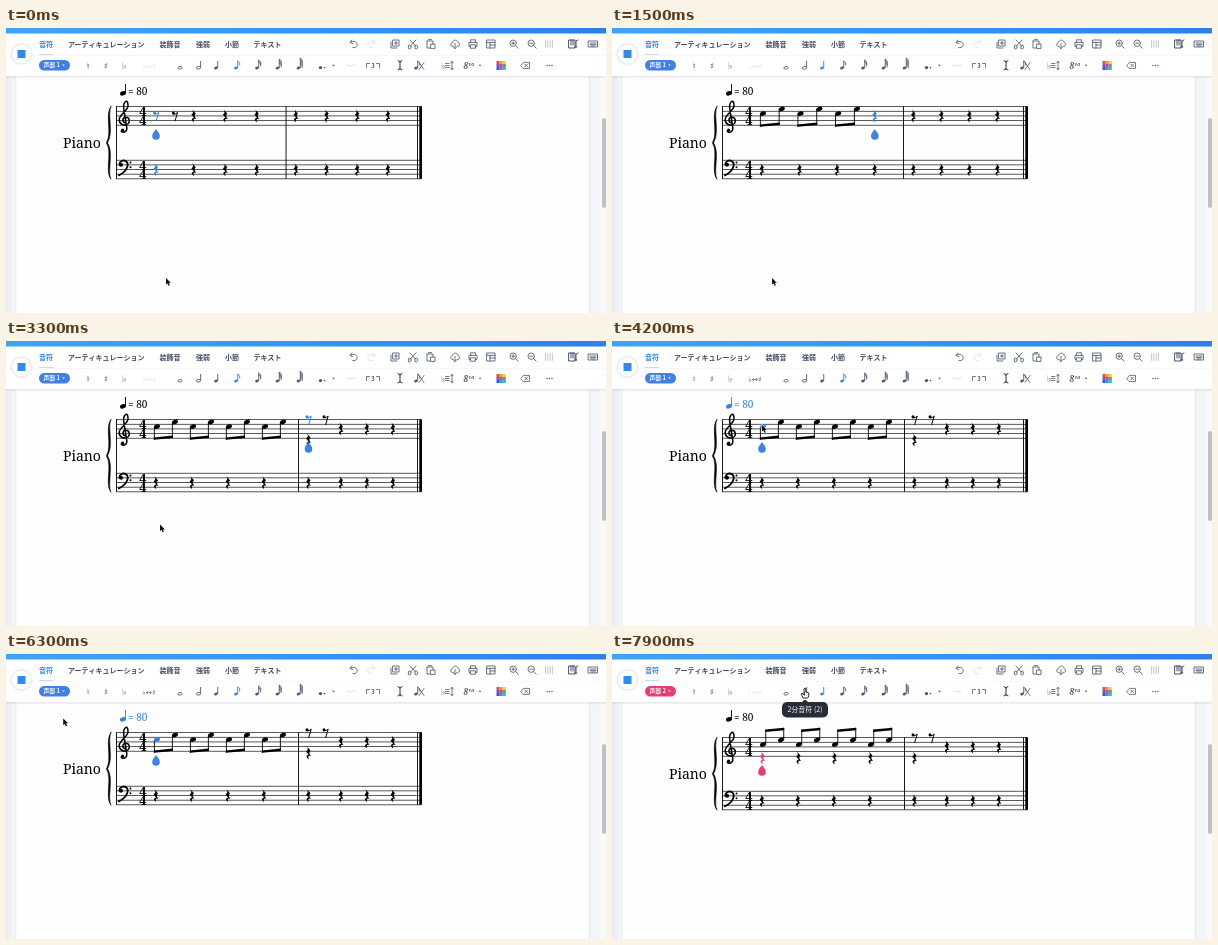
An HTML page with a canvas for the animation above (8 s loop, 600 px wide and 285 px high).

```html
<!DOCTYPE html>
<html lang="ja">
<head>
<meta charset="utf-8">
<title>Score editor</title>
<style>
html, body { margin: 0; width: 100%; height: 100%; overflow: hidden; background: #fff; }
canvas { display: block; width: 600px; height: 285px; }
</style>
</head>
<body>
<canvas id="stage"></canvas>
<script>
const LOOP = 8000;
const canvas = document.getElementById('stage');
const ctx = canvas.getContext('2d');
const dpr = window.devicePixelRatio || 1;
canvas.width = 600 * dpr;
canvas.height = 285 * dpr;

const BLUE = '#2f83ee', PINK = '#ea3a76', INK = '#000', ICON = '#4c5870', FAINT = '#dde0e6';
const SERIF = '"Noto Serif", serif';
const SANS = '"Noto Sans CJK JP", "Noto Sans CJK", "Noto Sans", sans-serif';

// ---------- drawing helpers ----------
function path(d, x, y, { fill, stroke, w = 1, s = 1 } = {}) {
  const p = new Path2D(d);
  ctx.save();
  ctx.translate(x, y);
  ctx.scale(s, s);
  ctx.lineWidth = w;
  ctx.lineCap = ctx.lineJoin = 'round';
  if (fill) { ctx.fillStyle = fill; ctx.fill(p); }
  if (stroke) { ctx.strokeStyle = stroke; ctx.stroke(p); }
  ctx.restore();
}
function rect(x, y, w, h, color) {
  ctx.fillStyle = color;
  ctx.fillRect(x, y, w, h);
}
function round(x, y, w, h, r, color) {
  ctx.beginPath();
  ctx.roundRect(x, y, w, h, r);
  ctx.fillStyle = color;
  ctx.fill();
}
function dot(x, y, r, color) {
  ctx.beginPath();
  ctx.arc(x, y, r, 0, Math.PI * 2);
  ctx.fillStyle = color;
  ctx.fill();
}
function text(str, x, y, font, color, align = 'left') {
  ctx.font = font;
  ctx.fillStyle = color;
  ctx.textAlign = align;
  ctx.fillText(str, x, y);
}
function gradient(x0, y0, x1, y1, ...colors) {
  const g = ctx.createLinearGradient(x0, y0, x1, y1);
  colors.forEach((c, i) => g.addColorStop(i / (colors.length - 1), c));
  return g;
}

// ---------- music glyphs ----------
const QUARTER = 'M-1.8-6.6L2-2.3Q-.5 .2 2.5 3.1Q-1.5 2.2 .3 6.6Q-4.2 3.2 .1 1.9L-2.4-1.2Q.6-3.4-1.8-6.6Z';
const TREBLE = 'M.2 16.2C-3 15.4-2.8 10.8 .6 10.6C4.6 10.4 5.4 15.4 2.8 17.4' +
  'C-.6 19.7-5.8 18-5.8 13C-5.8 7.6 3 4.2 3-.8C3-3.6 2.2-5.4 1.2-5.4' +
  'C-.8-4.2-1.8-1-1.2 2.4L1.8 21C2.3 25.4-2 27-3.8 24.4';
const BASS = 'M-5.2 4.4C-5 .6-1.2-.2 .8.7C5 2.6 4 10.4-5.6 15.2';

const quarterRest = (x, y, c = INK) => path(QUARTER, x, y, { fill: c });
function eighthRest(x, y, c = INK) {
  dot(x - 1.5, y - 2.7, 1.5, c);
  path('M-1.6-1.6Q1-1.2 2.7-3.4L.2 5', x, y, { stroke: c });
}
function head(x, y, c = INK) {
  ctx.beginPath();
  ctx.ellipse(x, y, 3.1, 2.15, -0.38, 0, Math.PI * 2);
  ctx.fillStyle = c;
  ctx.fill();
}
const stem = (x, y0, y1, c = INK) => rect(x - 0.4, Math.min(y0, y1), 0.9, Math.abs(y1 - y0), c);

function drop(x, y, c) {
  path('M0-6C1.4-3.4 3.8-2 3.8 1A3.8 3.8 0 0 1-3.8 1C-3.8-2-1.4-3.4 0-6Z', x, y, { fill: c });
}

function staff(y) {
  for (let i = 0; i < 5; i++) rect(110, y + i * 4.65 - 0.35, 305, 0.75, '#222');
  for (const b of [9.3, 18.6]) text('4', 137, y + b, `900 13px ${SERIF}`, INK, 'center');
}

// ---------- score ----------
// Bar widths for each count of beats split into eighths.
const LAYOUT = {
  1: { bar: 280, e: 18.9, q: 31.5, last: 382 },
  2: { bar: 286, e: 19.1, q: 31, last: 384 },
  3: { bar: 291.5, e: 18.8, q: 29, last: 385.5 },
  4: { bar: 297, e: 18.6, q: 28, last: 387 }
};
const SPLIT_NEXT = { bar: 292.5, e: 18, q: 28, last: 387 };

function notes(st, x, top) {
  const up = st.voice === 2;
  const ys = [top + 7, top + 2.4];
  for (let i = 0; i < st.n; i++) {
    const hi = i % 2, nx = x(i) + 1, c = st.picked && i === 0 ? BLUE : INK;
    const single = !hi && i === st.n - 1;
    const sx = nx + (up ? 2.7 : -2.7);
    const end = up ? top - 8 - hi * 1.8 : single ? top + 23 : top + 20.2 - hi * 1.8;
    stem(sx, ys[hi], end, single ? INK : INK);
    head(nx, ys[hi], c);
    if (single) path('M0 0C1 -4 5.5 -5 4 -10C4 -6.5 2 -6 0 -5Z', sx, end, { fill: INK });
    if (hi) {
      const px = x(i - 1) + 1 + (up ? 2.7 : -2.7), d = up ? 2.4 : -2.4, y0 = end + 1.8;
      path(`M${px - .4} ${y0}L${sx + .5} ${end}V${end + d}L${px - .4} ${y0 + d}Z`, 0, 0, { fill: INK });
    }
  }
}

function score(st) {
  const v2 = st.voice === 2, shift = v2 ? 5 : 0;
  const top = 78.6 + shift, low = 132.2 + shift, mid = top + 9.2, bassMid = low + 9.4;
  const L = st.next ? SPLIT_NEXT : LAYOUT[st.split];
  const x = i => 150 + L.e * Math.min(i, st.split * 2) + L.q * Math.max(0, i / 2 - st.split);

  const tc = st.picked ? BLUE : INK;
  head(117, 65.3, tc);
  stem(119.5, 56, 65, tc);
  text('= 80', 122, 66.5, `10px ${SERIF}`, tc);
  text('Piano', 57, 119.5 + shift, `14px ${SERIF}`, INK);

  staff(top);
  staff(low);
  path('M105 0C98.5 8 106.5 27 100.3 36.5C106.5 46 98.5 65 105 73C101.2 64 108 47 101.6 36.5C108 26 101.2 9 105 0Z',
    0, top - 0.3, { fill: INK, stroke: INK, w: 0.5 });
  const h = low + 18.9 - top;
  rect(110, top - 0.3, 0.9, h, INK);
  rect(L.bar - 0.4, top - 0.3, 0.9, h, INK);
  rect(411, top - 0.3, 0.9, h, INK);
  rect(413.3, top - 0.3, 2.7, h, INK);
  path(TREBLE, 119, top, { stroke: INK, w: 1.5 });
  dot(116.6, top + 23.6, 1.6, INK);
  path(BASS, 118.5, low, { stroke: INK, w: 1.8 });
  dot(115, low + 4.6, 2, INK);
  dot(124.5, low + 2.4, 1, INK);
  dot(124.5, low + 7, 1, INK);

  // first bar
  notes(st, x, top);
  for (let b = 0; b < 4; b++) {
    const i = b * 2, sel = k => (k === st.n ? BLUE : INK);
    if (b < st.split) {
      for (const k of [i, i + 1]) if (k >= st.n) eighthRest(x(k), mid, sel(k));
    } else quarterRest(x(i), mid, sel(i));
    quarterRest(x(i), bassMid, b === 0 && st.n === 0 ? BLUE : INK);
    if (v2) quarterRest(x(i) + 0.5, mid + 11, b === 0 ? PINK : INK);
  }

  // second bar
  const first = L.bar + 10, here = st.n === 8 && !st.picked && !v2 ? BLUE : INK;
  for (let b = 0; b < 4; b++) {
    const bx = st.next && b ? 335 + (b - 1) * 26 : first + b * (L.last - first) / 3;
    quarterRest(bx, bassMid);
    if (!st.next || b) quarterRest(bx, mid, b ? INK : here);
  }
  if (st.next) {
    eighthRest(first, mid - 9.3, here);
    eighthRest(first + 17, mid - 9.3);
    quarterRest(first, mid + 11);
  }

  const dx = st.picked || v2 ? 150 : st.n < 8 ? x(st.n) : first;
  drop(dx, v2 ? 117 : 107, v2 ? PINK : '#3b82ea');
}

// ---------- toolbars ----------
const ACTIONS = [
  [348, 'M-2-4L-4-1.6L-1.2-.4M-3.6-1.6C0-4.5 4-1.5 3 1.6C2.4 3.4 .5 4 -1.2 3.6'],
  [365, 'M2-4L4-1.6L1.2-.4M3.6-1.6C0-4.5-4-1.5-3 1.6C-2.4 3.4-.5 4 1.2 3.6', FAINT],
  [389, 'M-4-2V4H2M-2-4H4V2H-2ZM1-2.6V.6M-.6-1H2.6'],
  [407, 'M-3-4L2.5 2M3-4L-2.5 2M-2 3a1.4 1.4 0 1 1-2.6 0a1.4 1.4 0 1 1 2.6 0M4.6 3a1.4 1.4 0 1 1-2.6 0a1.4 1.4 0 1 1 2.6 0'],
  [425, 'M-4-3H2V0M-4-3V4H-1M-2.5-4.4H.5M0 0H4V4.4H0Z'],
  [449, 'M-2 2.4H-3C-5 1.8-4.6-1.2-2.5-1.4C-1.6-5 3-4.4 3-1.4C5.4-.8 5 2.4 2.6 2.4H2M0-.5V4.5M-1.6 3L0 4.6L1.6 3'],
  [467, 'M-2.4-1.6V-4.2H2.4V-1.6M-2.4 2.4H-4V-1.6H4V2.4H2.4M-2.4.8H2.4V4.2H-2.4Z'],
  [485, 'M-4-4H4V4H-4ZM-4-1.6H4M-1 1H4M-1-1.6V4'],
  [508, 'M2.4-.8a3.2 3.2 0 1 1-6.4 0a3.2 3.2 0 1 1 6.4 0M1.6 1.6L4.2 4.2M-2.2-.8H.6M-.8-2.2V.6'],
  [526, 'M2.4-.8a3.2 3.2 0 1 1-6.4 0a3.2 3.2 0 1 1 6.4 0M1.6 1.6L4.2 4.2M-2.2-.8H.6'],
  [543, 'M-3.4-3.4V3.4M-1.2-3.4V3.4M1.2-3.4V3.4M3.4-3.4V3.4', '#b9bec8'],
  [567, 'M-4-4H2V4H-4ZM-2-4V1M0-4V1M3 3V-3L5-4M3.8 3H2', '#26324c'],
  [587, 'M-4.5-3H4.5V3H-4.5ZM-3-1H3M-3 .6H3M-2 2H2']
];
const TABS = [['音符', 33], ['アーティキュレーション', 62], ['装飾音', 153.5], ['強弱', 190], ['小節', 219], ['テキスト', 247.5]];

function iconNote(x, flags, c) {
  ctx.beginPath();
  ctx.ellipse(x - 1, 40, 1.9, 1.3, -0.4, 0, 7);
  ctx.fillStyle = c;
  ctx.fill();
  stem(x + 0.7, 33 - Math.max(0, flags - 1), 40, c);
  for (let i = 0; i < flags; i++) {
    path('M0 0Q3 1.4 2 4', x + 0.8, 33 - Math.max(0, flags - 1) + i * 1.9, { stroke: c, w: 0.9 });
  }
}

function tools(st) {
  const sym = (s, x, c = ICON, size = 9) => text(s, x, 40.5, `${size}px "DejaVu Sans", sans-serif`, c, 'center');
  round(33, 32, 31, 10.5, 5.2, st.voice === 2 ? PINK : '#3f7fe6');
  text(`声部 ${st.voice}`, 37.5, 39.4, `bold 5.8px ${SANS}`, '#fff');
  path('M-1.3-.6H1.3L0 .9Z', 57.5, 37.2, { fill: '#fff' });

  sym('♮', 82, st.natural ? BLUE : ICON);
  sym('♯', 100);
  sym('♭', 118);
  sym('♭↔♯', 143, st.picked ? ICON : FAINT, 7.5);

  const ring = x => {
    ctx.beginPath();
    ctx.ellipse(x, 39.8, 2.1, 1.3, -0.2, 0, 7);
    ctx.strokeStyle = ICON;
    ctx.lineWidth = 0.9;
    ctx.stroke();
  };
  ring(174);
  ring(192.5);
  stem(194.6, 33, 39.5, ICON);
  [211, 231, 252, 272.5, 293.5].forEach((x, i) => iconNote(x, i, st.dur === i ? BLUE : ICON));
  dot(314.5, 39.6, 1.7, ICON);
  dot(318.5, 39.6, 0.8, ICON);
  path('M-1.3-.7H1.3L0 .9Z', 327.5, 37.5, { fill: ICON });
  path('M-4 0Q0 2.4 4 0', 345, 37, { stroke: FAINT });
  path('M-6.5 2V-2H-3.5M6.5 2V-2H3.5', 367, 37.5, { stroke: ICON, w: 0.8 });
  text('3', 367, 40, `bold 6px ${SANS}`, ICON, 'center');
  path('M-2-4.6Q0-4.6 0-3Q0-4.6 2-4.6M0-3.4V3.4M-2 4.6Q0 4.6 0 3Q0 4.6 2 4.6', 394, 37.3, { stroke: '#26324c', w: 1 });
  iconNote(411, 1, ICON);
  path('M-2-3L3 4M3-3L-2 4', 415, 37.5, { stroke: ICON, w: 0.8 });
  sym('♭', 437);
  path('M-1.5-2H2M-1.5 0H2M-1.5 2H2M5-4V4M3.7-2.6L5-4.2L6.3-2.6M3.7 2.6L5 4.2L6.3 2.6', 441, 37.5, { stroke: ICON, w: 0.8 });
  text('8', 457.5, 40.5, `italic bold 8px ${SERIF}`, ICON);
  text('va', 462.5, 37.5, `italic bold 4.5px ${SERIF}`, ICON);
  path('M-1.3-.7H1.3L0 .9Z', 474, 37.5, { fill: ICON });
  ['#e84b4b', '#f09a35', '#e8d040', '#8d48d0', '#cf3ea0', '#46b45a', '#3554d8', '#3c8fe8', '#35bcae']
    .forEach((c, i) => rect(490.5 + i % 3 * 3.1, 33 + Math.floor(i / 3) * 3, 3.1, 3, c));
  path('M-4.5 0L-2-3H4V3H-2ZM-.6-1.3L2 1.3M2-1.3L-.6 1.3', 519.5, 37.4, { stroke: ICON, w: 0.8 });
  for (const x of [541, 543.5, 546]) dot(x, 37.5, 0.75, ICON);
}

function frame(st, t) {
  rect(0, 0, 600, 285, '#f4f5f8');
  rect(0, 48, 10, 237, gradient(0, 0, 10, 0, '#e9ebf0', '#f7f8fa'));
  rect(10, 48, 573, 237, '#fefeff');
  rect(9.5, 48, 0.7, 237, '#e2e4e9');
  rect(582.8, 48, 0.7, 237, '#e2e4e9');
  rect(594, 48, 6, 237, '#fafafa');
  round(596, 90, 4, 90, 2, '#bfc0c3');
  score(st);

  rect(0, 48, 600, 3, gradient(0, 48, 0, 51, 'rgba(60,70,100,.13)', 'rgba(60,70,100,0)'));
  rect(0, 5, 600, 43, '#fff');
  rect(0, 27, 600, 0.6, '#f1f2f5');
  rect(0, 0, 600, 5.5, gradient(0, 0, 600, 0, '#3fa4f8', '#2f97f6', '#2c80ea'));

  TABS.forEach(([s, x], i) => text(s, x, 18.7, `bold 7px ${SANS}`, i ? '#404c66' : BLUE));
  rect(33, 26, 14, 1, '#c3dcfa');
  for (const [x, d, c = ICON] of ACTIONS) path(d, x, 16, { stroke: c, w: 0.85 });
  tools(st);

  ctx.save();
  ctx.shadowColor = 'rgba(40,50,80,.3)';
  ctx.shadowBlur = 3 * dpr;
  dot(15.5, 26, 9.5, '#fff');
  ctx.restore();
  if (st.saving) {
    ctx.lineWidth = 1.2;
    for (const [c, a, b] of [['#d9dce2', 0, 6.3], ['#9aa4b5', t / 130, t / 130 + 1.5]]) {
      ctx.beginPath();
      ctx.arc(15.5, 26, 7, a, b);
      ctx.strokeStyle = c;
      ctx.stroke();
    }
  } else rect(11.5, 22, 8, 8, '#2b8df0');
}

// ---------- timeline ----------
const STEPS = [
  [0, { n: 0, split: 1, dur: 1, voice: 1, next: false, picked: false, natural: false, saving: false }],
  [300, { n: 1 }],
  [500, { n: 2, dur: 0 }],
  [600, { split: 2, dur: 1, saving: true }],
  [800, { n: 3 }],
  [1000, { n: 4, dur: 0 }],
  [1100, { split: 3, dur: 1, saving: false }],
  [1300, { n: 5 }],
  [1500, { n: 6, dur: 0 }],
  [1600, { split: 4, dur: 1 }],
  [1700, { n: 7 }],
  [1900, { n: 8, dur: 0 }],
  [2300, { next: true, dur: 1 }],
  [4000, { picked: true, natural: true }],
  [6500, { voice: 2, dur: 0, picked: false, natural: false }]
];
const MOUSE = [
  [0, 160, 250], [2950, 160, 250], [3300, 154, 183.5], [3500, 102, 39], [3700, 102, 39],
  [3950, 150, 84], [4600, 150, 84], [5000, 92, 52], [5500, 92, 52], [5800, 55, 38],
  [6100, 55, 38], [6400, 58, 73.5], [7250, 58, 73.5], [7650, 193, 35]
];

function stateAt(t) {
  return Object.assign({}, ...STEPS.filter(([at]) => at <= t).map(s => s[1]));
}
function mouseAt(t) {
  const i = MOUSE.findIndex(m => m[0] > t);
  if (i < 0) return MOUSE[MOUSE.length - 1].slice(1);
  const [t0, x0, y0] = MOUSE[i - 1], [t1, x1, y1] = MOUSE[i];
  const p = (t - t0) / (t1 - t0), k = p * p * (3 - 2 * p);
  return [x0 + (x1 - x0) * k, y0 + (y1 - y0) * k];
}

function pointer(x, y) {
  if (y < 43) {
    path('M-.8-.5Q0-1.3.8-.5V3L3.8 4V7L2.6 9H-1.8L-4 5Q-3.2 4-2 5L-.8 6Z', x, y, { fill: '#fff', stroke: '#111', w: 0.9 });
  } else {
    path('M0 0V6.6L1.5 5.3L2.6 7.8L3.8 7.2L2.8 4.9H4.8Z', x, y, { fill: '#111', stroke: '#fff', w: 0.9 });
    path('M0 0V6.6L1.5 5.3L2.6 7.8L3.8 7.2L2.8 4.9H4.8Z', x, y, { fill: '#111' });
  }
}

function draw(now) {
  const t = now % LOOP;
  ctx.setTransform(dpr, 0, 0, dpr, 0, 0);
  frame(stateAt(t), t);
  if (t >= 7800) {
    path('M-3.5 0L0-3L3.5 0Z', 193, 48.5, { fill: '#292b38' });
    round(170, 48, 46, 15.5, 5, '#292b38');
    text('2分音符 (2)', 193, 58.4, `7px ${SANS}`, '#fff', 'center');
  }
  pointer(...mouseAt(t));
}

const start = performance.now();
function tick() {
  draw(performance.now() - start);
  requestAnimationFrame(tick);
}
tick();
</script>
</body>
</html>
```
